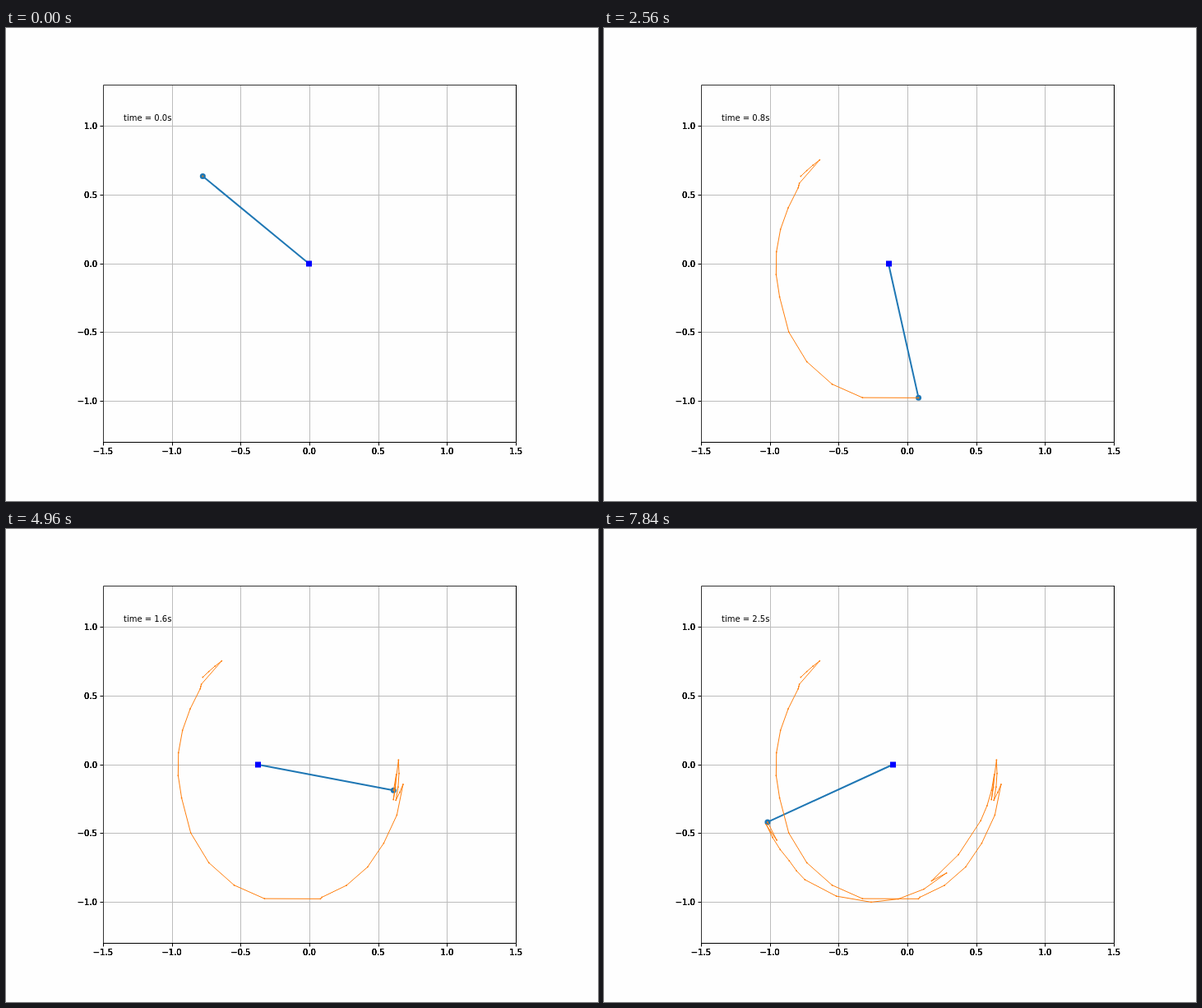
Animation of 720 by 576 pixels, one loop 8 s. Source, as an HTML page:

```html
<!DOCTYPE html>
<html lang="en">
<head>
<meta charset="utf-8">
<title>Pendulum on a cart</title>
<style>
  html, body { margin: 0; width: 100%; height: 100%; overflow: hidden; background: #fefefe; }
  svg { display: block; width: 720px; height: 576px; }
  text { font: 10px "DejaVu Sans", sans-serif; white-space: pre; }
  .grid { stroke: #bcbcbc; }
  .axis { stroke: #000; fill: none; }
  .soft { stroke: #333; fill: none; }
  .trace { stroke: #ff7f0e; fill: none; stroke-linejoin: round; }
  .dots { stroke: #ff7f0e; stroke-width: 1.8; stroke-linecap: round; }
  .rod { stroke: #1f77b4; stroke-width: 2; }
  .bob { fill: #1f77b4; }
  .cart { fill: #00f; }
</style>
</head>
<body>
<svg id="stage" viewBox="0 0 720 576"></svg>
<script>
const STEP_MS = 160;
const STEPS = 50;
const ORIGIN = { x: 369, y: 287 };
const UNIT = 167.4;

// Key poses as [step, value]: rod angle in degrees from straight down
const SWING = [
  [0, -129.5], [3, -139], [4, -125.8], [6, -123.5], [11, -76], [15, -13],
  [16, 12.6], [17, 15.3], [22, 81.8], [24, 75], [27, 92], [28, 75.3],
  [30, 85.9], [33, 66], [35, 32.3], [36, 38], [39, -0.7], [41, -33.2],
  [46, -64.3], [48, -56.7], [49, -65.3]
];
// Cart position in stage pixels
const DRIVE = [
  [0, 368.5], [7, 377], [11, 376], [20, 322], [24, 312.5],
  [34, 304.5], [43, 345], [49, 351]
];

const stage = document.getElementById('stage');

function add(tag, attrs, content = '') {
  const node = document.createElementNS('http://www.w3.org/2000/svg', tag);
  set(node, attrs);
  node.textContent = content;
  return stage.appendChild(node);
}

function set(node, attrs) {
  for (const key in attrs) node.setAttribute(key, attrs[key]);
}

function valueAt(keys, step) {
  const next = Math.max(1, keys.findIndex(([s]) => s >= step));
  const [[s0, v0], [s1, v1]] = keys.slice(next - 1, next + 1);
  return v0 + (v1 - v0) * (step - s0) / (s1 - s0);
}

function tipAt(step) {
  const angle = valueAt(SWING, step) * Math.PI / 180;
  return [
    valueAt(DRIVE, step) + UNIT * Math.sin(angle),
    ORIGIN.y + UNIT * Math.cos(angle)
  ];
}

// Repeated drawing darkens the antialiased edges of the tick labels
function tickLabel(x, y, anchor, value) {
  const label = value.toFixed(1).replace('-', '\u2212');
  for (let i = 0; i < 4; i++) add('text', { x, y, 'text-anchor': anchor }, label);
}

function drawAxes() {
  let ticks = '';
  for (let v = -1.5; v <= 1.5; v += 0.5) {
    const x = Math.round(ORIGIN.x + v * UNIT) + 0.5;
    const y = Math.floor(ORIGIN.y - v * UNIT + 0.2) + 0.5;
    if (Math.abs(v) < 1.5) add('path', { class: 'grid', d: `M${x} 69V504` });
    ticks += `M${x} 504.5v4`;
    tickLabel(ORIGIN.x + v * UNIT, 519, 'middle', v);
    if (Math.abs(v) < 1.3) {
      add('path', { class: 'grid', d: `M118 ${y}H620` });
      ticks += `M118.5 ${y}h-4`;
      tickLabel(111, y + 3.5, 'end', v);
    }
  }
  add('path', { class: 'axis', d: ticks });
  add('path', { class: 'soft', d: 'M118.5 505V69.5H621' });
  add('path', { class: 'axis', d: 'M118 504.5H620.5V69' });
}

// Exact halves round to the even tenth
function clockText(step) {
  const seconds = step * 0.05 - (step % 20 === 5 ? 0.01 : 0);
  return `time = ${seconds.toFixed(1)}s`;
}

drawAxes();
const tips = Array.from({ length: STEPS }, (_, step) => tipAt(step));
const rod = add('line', { class: 'rod', y2: ORIGIN.y });
const bob = add('circle', { class: 'bob', r: 3.5 });
const trace = add('path', { class: 'trace' });
const dots = add('path', { class: 'dots' });
const cart = add('rect', { class: 'cart', y: ORIGIN.y - 3.5, width: 7, height: 7 });
const clock = add('text', { x: 143, y: 113 });

let shown = -1;

function show(step) {
  const [x, y] = tips[step];
  const base = valueAt(DRIVE, step);
  const past = tips.slice(0, step + 1);
  set(rod, { x1: x, y1: y, x2: base });
  set(bob, { cx: x, cy: y });
  set(cart, { x: Math.round(base - 3.5) });
  set(trace, { d: 'M' + past.join('L') });
  set(dots, { d: past.map(p => `M${p}h0`).join('') });
  clock.textContent = clockText(step);
}

const start = performance.now();

function tick() {
  const elapsed = performance.now() - start;
  const step = Math.floor(elapsed / STEP_MS) % STEPS;
  if (step !== shown) show(shown = step);
  requestAnimationFrame(tick);
}

tick();
</script>
</body>
</html>
```
